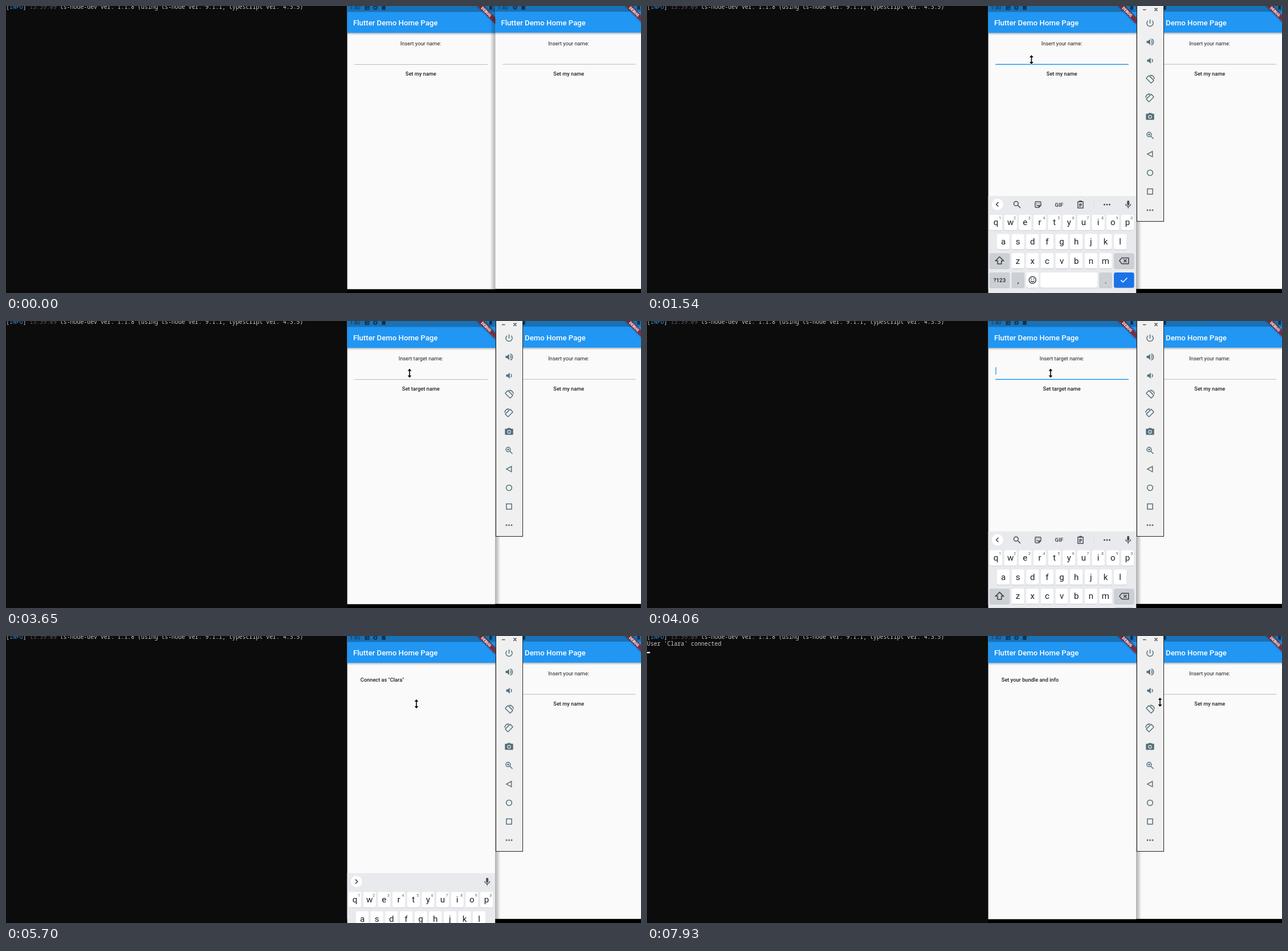
Write an HTML page that moves like this. It is 1114 px wide and 503 px high and loops after 8 s.

```html
<!DOCTYPE html>
<html lang="en">
<head>
<meta charset="utf-8">
<title>Chat demo</title>
<style>
  html, body { margin: 0; width: 100%; height: 100%; overflow: hidden; background: #0c0c0c; }
  svg { display: block; width: 100%; height: 100%; }
  text { font-family: Roboto, sans-serif; white-space: pre; }
  .mono { font: 9.9px "Noto Sans Mono", "DejaVu Sans Mono", monospace; fill: #ccc; }
  .mid { text-anchor: middle; }
  .line { fill: none; stroke: currentColor; stroke-width: 1.5; }
</style>
</head>
<body>
<svg id="stage" viewBox="0 0 1114 503"></svg>
<script>
const LOOP = 8000, STEP = 70, SLIDE = 172;
const ME = 'Clara', PEER = 'Ned';
const INK = '#212121', SLATE = '#546e7a';

// Markup helpers
const rect = (x, y, w, h, fill, more = '') =>
  `<rect x="${x}" y="${y}" width="${w}" height="${h}" fill="${fill}" ${more}/>`;
const text = (x, y, size, str, more = '') =>
  `<text x="${x}" y="${y}" font-size="${size}" ${more}>${str}</text>`;
const mid = (x, y, size, str, more = '') => text(x, y, size, str, `class="mid" ${more}`);
const at = (x, y, body, more = '') => `<g transform="translate(${x} ${y})" ${more}>${body}</g>`;
const line = (d, more = '') => `<path class="line" d="${d}" ${more}/>`;
const solid = (d) => `<path d="${d}" fill="currentColor"/>`;
const ring = (r, cx = 0, cy = 0) => `<circle class="line" r="${r}" cx="${cx}" cy="${cy}"/>`;
const dot = (r, cx = 0, cy = 0) => `<circle r="${r}" cx="${cx}" cy="${cy}" fill="currentColor"/>`;
const dots = [-4.5, 0, 4.5].map(x => dot(1.5, x)).join('');
const fade = (id, dir, stops) => `<linearGradient id="${id}" ${dir}>` +
  stops.map((o, i) => `<stop offset="${i}" stop-opacity="${o}"/>`).join('') + '</linearGradient>';

const lens = ring(3.9, -1.6, -1.6) + line('M1.4 1.4L6 6', 'stroke-width="2"');
const mic = rect(-2, -6.8, 4, 8.4, 'currentColor', 'rx="2"') + line('M-4.3-1a4.3 4.3 0 0 0 8.6 0M0 3.3v3.2');
const speaker = 'M-6-2h2.8l3.4-3.4v10.8l-3.4-3.4h-2.8z';
const turn = rect(-3.4, -6.1, 6.8, 12.2, 'none', 'class="line" rx=".8" transform="rotate(-45)"') +
  line('M1.2-7.2a7.6 7.6 0 0 1 6.4 6.5', 'stroke-width="1.2"') + solid('M-.4-7.7l4 .2l-2 2.2z');

// Emulator side panel
function panel() {
  const icons = [
    line('M-3.6-4.6a5.6 5.6 0 1 0 7.2 0M0-6.8v7.2'),
    solid(speaker) + line('M2 -2.6a3 3 0 0 1 0 5.2M2-5.4a5.6 5.6 0 0 1 0 10.8'),
    at(1, 0, solid(speaker) + line('M2-2.6a3 3 0 0 1 0 5.2')),
    turn,
    `<g transform="scale(-1 1)">${turn}</g>`,
    solid('M-2-6.6h4l1.3 1.4h2.6q1.3 0 1.3 1.3v8q0 1.3-1.3 1.3h-11.8q-1.3 0-1.3-1.3v-8q0-1.3 1.3-1.3h2.6z') +
      '<circle r="3.2" cy=".2" fill="#f0f0f0"/>' + dot(2.1, 0, .2),
    lens + line('M-3.4-1.6h3.6M-1.6-3.4v3.6', 'stroke-width="1"'),
    line('M4.2-4.8v9.6L-4.6 0z'),
    ring(4.9),
    line('M-4.6-4.6h9.2v9.2h-9.2z'),
    dots
  ];
  return rect(859.5, -2, 47, 379.5, '#f0f0f0', 'stroke="#222"') +
    line('M870 6.5h5.5M890.4 3.6l5 5m0-5l-5 5', 'color="#555" stroke-width="1"') +
    `<g color="${SLATE}">${icons.map((s, i) => at(882.5, 30.3 + i * 32.75, s)).join('')}</g>`;
}

function ribbon() {
  const bar = (fill, more) => rect(-26.5, 18.5, 53, 8, fill, more);
  return at(858.4, -5.8, `<g transform="rotate(45)">${bar('#000', 'opacity=".5" filter="url(#soft)"')}` +
    bar('#b71c1c', 'opacity=".63"') +
    mid(0, 24.9, 6.8, 'DEBUG', 'fill="#fff" font-weight="900"') + '</g>');
}

const sd = (x) => at(x, 3, solid('M-1.5-3.8h4.7v7.6h-6.4v-6z'));
const gear = (x) => at(x, 3, ring(2.4) +
  '<circle class="line" r="3.5" stroke-dasharray="1.4 1.35" style="stroke-width:1.3"/>');

function form(label, button) {
  return mid(727.6, 69.2, 9.26, label, `fill="${INK}"`) +
    mid(727.8, 122.1, 9.26, button, `fill="${INK}" font-weight="500"`);
}
const link = (str) => text(621.8, 80, 9.26, str, `fill="${INK}" font-weight="500"`);
const rule = (id = '') => rect(611.4, 102.1, 233.4, .9, '#b5b5b5', id);

function phone(status, body) {
  return rect(598.4, 0, 260, 503, '#000') + rect(598.4, 0, 260, 496.3, '#fafafa') +
    rect(598.4, 47.2, 260, 4, 'url(#drop)') +
    rect(598.4, 0, 260, 47.2, '#2196f3') + rect(598.4, 0, 260, 10.4, '#1971b6') +
    `<g color="#0b324f">${text(603, 6.4, 9.6, '1:40', 'fill="currentColor"')}${status}` +
    solid('M848-1h4.6v7.6h-4.6z') + '</g>' +
    text(608.9, 34.2, 13.2, 'Flutter Demo Home Page', 'fill="#fff" font-weight="500"') +
    ribbon() + body;
}

// On-screen keyboard
function key(x, row, w, face, fill = '#fff') {
  const y = 378 + row * 33.6;
  return rect(x - w / 2, y - 12.4, w, 26.8, '#c3c6cb', 'rx="3.2"') +
    rect(x - w / 2, y - 13.3, w, 26.8, fill, 'rx="3.2"') + at(x, y, face);
}
function keyboard() {
  const GREY = '#ccd0d5', PITCH = 25.65;
  const letters = (str, x0, row) => [...str].map((c, i) =>
    key(x0 + i * PITCH, row, 22.4, mid(0, 5, 15.2, c) +
      (row ? '' : mid(7.4, -5.6, 6.8, (i + 1) % 10, 'fill="#5f6368"')))).join('');
  const chevron = (d) => line(d, 'color="#3c4043"');
  const icons = at(649, 346.5, lens) +
    at(686, 346.5, line('M-5-3.5q0-1.5 1.5-1.5h7q1.5 0 1.5 1.5v5L1.5 5h-5q-1.5 0-1.5-1.5zM1.5 5v-3.5h3.5M-2.6 .5q1.8 2.4 3.6 .6') + dot(.8, -2, -2) + dot(.8, 2, -2)) +
    mid(723, 350.2, 9.8, 'GIF', 'font-weight="700" fill="currentColor"') +
    at(760.5, 346.5, line('M-4.6-5h9.2v11h-9.2zM-2.5-1h5M-2.5 1.2h5M-2.5 3.4h3') + solid('M-2.4-7h4.8v3h-4.8z')) +
    rect(783.6, 338, .7, 17, '#d3d6da') + at(807, 346.5, dots);
  const words = [656, 727, 798].map(x => mid(x, 350.8, 12, '', 'class="word" fill="#4a4e54"')).join('') +
    `<g id="bars">${[689.5, 764.8].map(x => rect(x, 338, .8, 17, '#cdd0d4')).join('')}</g>`;
  return rect(598.4, 331.5, 260, 260, '#e8eaed') +
    '<circle cx="614.7" cy="346.3" r="10" fill="#fff"/>' +
    at(614.7, 346.3, `<g id="back">${chevron('M1.7-3.8L-2 0l3.7 3.8')}</g><g id="more">${chevron('M-1.7-3.8L2 0l-3.7 3.8')}</g>`) +
    `<g color="#4a4e54"><g id="icons">${icons}</g><g id="words">${words}</g>${at(844.2, 346.5, mic)}</g>` +
    `<g fill="#202124" color="#3c4043">` +
    letters('qwertyuiop', 612.1, 0) + letters('asdfghjkl', 625, 1) + letters('zxcvbnm', 650.6, 2) +
    key(618.5, 2, 35.4, line('M0-7l7 7h-3.6v5.4h-6.8v-5.4h-3.6z'), GREY) +
    key(836.8, 2, 35.4, line('M-8 0l4.2-5.2h11.8v10.4h-11.8zM-.6-2.6l5.2 5.2m0-5.2l-5.2 5.2'), GREY) +
    key(618.5, 3, 35.4, mid(0, 3.6, 9.8, '?123', 'font-weight="500"'), GREY) +
    key(651, 3, 22.4, mid(0, 6, 14, ','), GREY) +
    key(676.3, 3, 22.4, ring(6) + dot(1, -2.2, -1.6) + dot(1, 2.2, -1.6) + line('M-3 1.4q3 3.8 6 0')) +
    key(740.3, 3, 100.4, '') + key(804.6, 3, 22.4, mid(0, 6, 14, '.'), GREY) +
    key(836.8, 3, 35.4, line('M-5.4 .2l3.6 3.6l7.4-7.4', 'color="#fff"'), '#1a73e8') + '</g>';
}

const term = `<text class="mono" x="0" y="5">[<tspan fill="#3a96dd">INFO</tspan>] ` +
  `<tspan fill="#61565f">13:39:09</tspan> ts-node-dev ver. 1.1.8 (using ts-node ver. 9.1.1, typescript ver. 4.3.5)</text>` +
  `<g id="log"><text class="mono" x="0" y="17">User '${ME}' connected</text>${rect(0, 27.8, 5.4, 2.4, '#f2f2f2')}</g>`;

const pages = `<g id="mine">${form('Insert your name:', 'Set my name')}</g>` +
  `<g id="target">${form('Insert target name:', 'Set target name')}</g>` +
  `<g id="connect">${link(`Connect as "${ME}"`)}</g>` +
  `<g id="bundle">${link('Set your bundle and info')}</g>` +
  `<g id="field">${rule()}${rect(611.4, 101.6, 233.4, 1.5, '#2196f3', 'id="focus"')}` +
  text(611.4, 91, 10.6, '', `id="typed" fill="${INK}"`) +
  rect(611.4, 92.3, 0, .7, '#444', 'id="under"') + rect(0, 80.8, 1.3, 13, '#2196f3', 'id="caret"') + '</g>' +
  '<circle id="ripple" cx="680" cy="83" clip-path="url(#tap)" opacity=".06"/>';

document.getElementById('stage').innerHTML = `<defs>
  ${fade('drop', 'x2="0" y2="1"', [.26, 0])}${fade('left', '', [0, .28])}${fade('right', '', [.3, 0])}
  <filter id="soft" x="-20%" y="-100%" width="140%" height="300%"><feGaussianBlur stdDeviation="1.6"/></filter>
  <clipPath id="tap">${rect(622, 72, 75, 20, '#000')}</clipPath>
  <clipPath id="screen">${rect(598.4, 0, 260, 503, '#000')}</clipPath></defs>` +
  rect(0, 0, 1114, 503, '#0c0c0c') + term +
  at(259.5, -.4, `<g clip-path="url(#screen)">${phone(gear(633.5) + sd(648), form('Insert your name:', 'Set my name') + rule())}</g>`) +
  rect(857, 495.9, 257, 8, '#000') +
  `<g clip-path="url(#screen)">` +
  phone(at(633.5, 3, line('M-3.2-3.3h6.4v6.6h-6.4zM-3-1h6M-3 1h4')) + gear(648) + sd(662.5), pages) +
  `<g id="keys">${keyboard()}</g></g>` +
  rect(849, 0, 9, 496, 'url(#left)', 'id="shadeL"') +
  `<g id="raised">${rect(858.4, 0, 9, 496, 'url(#right)')}${panel()}</g>` +
  `<path id="mouse" d="M0-8l3.4 4h-2.6v8h2.6L0 8l-3.4-4h2.6v-8h-2.6z" stroke="#fff" stroke-width="1.2" paint-order="stroke"/>`;

const $ = (id) => document.getElementById(id);
const show = (id, on) => $(id).style.display = on ? '' : 'none';
const wordEls = [...document.querySelectorAll('text.mid')].filter(e => e.closest('#words'));

// Changes of state: [time, patch]
const start = { page: 'mine', typed: '', words: [] };
const changes = [
  [810, { raised: true }],
  [1080, { focus: true }],
  [1680, { caret: true }],
  [1950, { typed: ME.slice(0, 1) }],
  [2150, { bar: true, words: ['C', 'Call', 'Can'] }],
  [2350, { typed: ME.slice(0, 2) }],
  [2420, { words: ['Cl', 'Class', 'Clean'] }],
  [2490, { typed: ME.slice(0, 3) }],
  [2620, { typed: ME.slice(0, 4) }],
  [2750, { typed: ME, words: [ME, 'Alive', 'Slice'] }],
  [3040, { page: 'target', typed: '', focus: false, caret: false }],
  [3650, { bar: false, words: [] }],
  [3920, { focus: true, caret: true }],
  [4330, { typed: PEER.slice(0, 1) }],
  [4400, { typed: PEER.slice(0, 2), bar: true, words: ['Ne', 'New', 'No'] }],
  [4530, { typed: PEER, words: ['Ne', PEER, 'No'] }],
  [4990, { caret: false }],
  [5490, { page: 'connect', typed: '', focus: false, words: [] }],
  [7260, { page: 'bundle', log: true }]
];

// Pointer moves: [time, steps, x, y]
const moves = [
  [70, 1, 1010, 438], [140, 3, 674.5, 94], [2820, 3, 720, 118.5], [3400, 4, 708, 91.5],
  [4930, 5, 720, 119], [6100, 5, 680, 83], [7860, 2, 900, 116]
];

// Keyboard slides: [time, rising]
const slides = [[1260, true], [3240, false], [3920, true], [5490, false]];

const heldSteps = (t, from) => Math.floor((t - from) / STEP + 1e-6);

function pointer(t) {
  let x = 0, y = 0;
  for (const [from, n, tx, ty] of moves) {
    if (t < from) break;
    const p = Math.min(1, (heldSteps(t, from) + 1) / n), e = p * p * (3 - 2 * p);
    x += (tx - x) * e;
    y += (ty - y) * e;
  }
  return [x, y];
}

function keysOffset(t) {
  let y = SLIDE;
  for (const [from, rising] of slides) {
    if (t < from) break;
    const p = Math.min(1, heldSteps(t, from) / 5);
    y = SLIDE * (rising ? (1 - p) ** 3 : p ** 1.4);
  }
  return y;
}

function render(t) {
  const s = { ...start };
  for (const [from, patch] of changes) if (t >= from) Object.assign(s, patch);

  for (const page of ['mine', 'target', 'connect', 'bundle']) show(page, page === s.page);
  show('field', s.page === 'mine' || s.page === 'target');
  show('focus', s.focus);
  show('caret', s.caret);
  show('raised', s.raised);
  show('shadeL', !s.raised);
  show('log', s.log);

  $('typed').textContent = s.typed;
  const width = s.typed ? $('typed').getComputedTextLength() : 0;
  $('under').setAttribute('width', width);
  $('caret').setAttribute('x', 611.4 + width);

  show('icons', !s.bar);
  show('back', !s.bar);
  show('more', s.bar);
  show('words', s.bar);
  show('bars', s.words.length);
  wordEls.forEach((e, i) => e.textContent = s.words[i] || '');

  const y = keysOffset(t);
  show('keys', y < SLIDE);
  $('keys').setAttribute('transform', `translate(0 ${y})`);

  const ripple = t >= 6840 && t < 7040;
  show('ripple', ripple);
  if (ripple) $('ripple').setAttribute('r', 15 + 22 * heldSteps(t, 6840));

  show('mouse', t >= moves[0][0]);
  $('mouse').setAttribute('transform', `translate(${pointer(t)})`);
}

const origin = performance.now();
function tick() {
  render((performance.now() - origin) % LOOP);
  requestAnimationFrame(tick);
}
tick();
</script>
</body>
</html>
```
